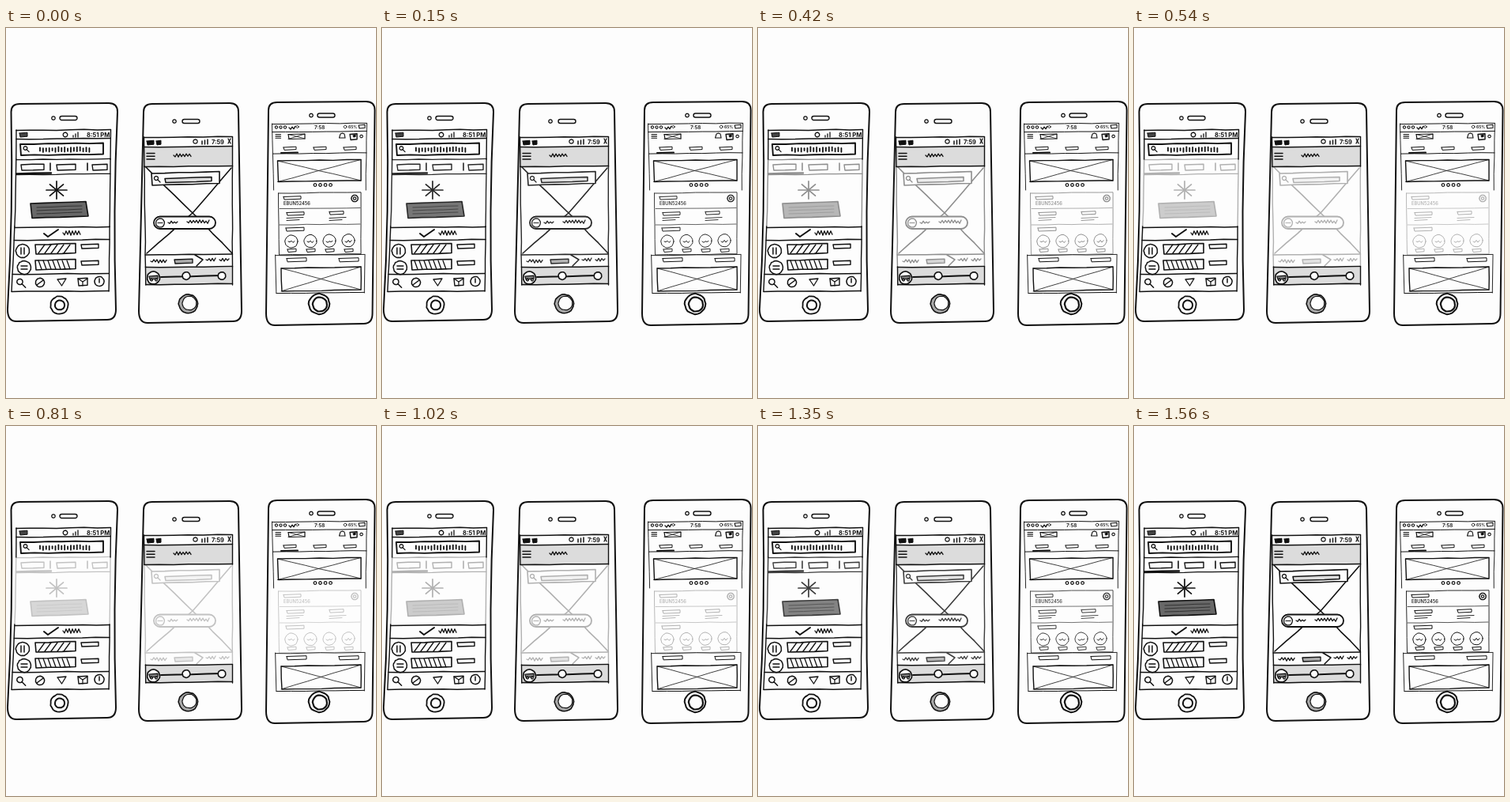
Write an HTML page that moves like this. It is 468 by 468 pixels and loops after 1790 ms.

```html
<!DOCTYPE html>
<html lang="en">
<head>
<meta charset="utf-8">
<title>Phone wireframes</title>
<style>
  html, body { margin: 0; width: 100%; height: 100%; overflow: hidden; background: #fdfdfd; }
  svg { display: block; width: 468px; height: 468px; }
  path { stroke-linecap: round; stroke-linejoin: round; }
  text { font-family: Inter, "DejaVu Sans", sans-serif; fill: #111; }
</style>
</head>
<body>
<svg id="stage" viewBox="0 0 468 468">
  <g id="still"></g>
  <g id="fading"></g>
</svg>
<script>
const INK = '#111', PAPER = '#fdfdfd', GREY = '#dcdcdc';
const still = document.getElementById('still');
const fading = document.getElementById('fading');
let layer = still;

let seed = 11;
const rand = () => (seed = (seed * 16807) % 2147483647) / 2147483647;
const jit = a => (rand() - 0.5) * a;
const repeat = (n, draw) => { for (let i = 0; i < n; i++) draw(i); };

function add(tag, attrs, text = '') {
  const el = document.createElementNS('http://www.w3.org/2000/svg', tag);
  for (const k in attrs) el.setAttribute(k, attrs[k]);
  el.textContent = text;
  layer.appendChild(el);
}
const path = (d, w, fill = 'none', stroke = INK) =>
  add('path', { d, fill, stroke, 'stroke-width': w });
const label = (x, y, size, str, weight = 600) =>
  add('text', { x, y, 'font-size': size, 'font-weight': weight }, str);

// Straight strokes with a slightly unsteady hand
function line(p, w = 1.2, fill, stroke) {
  let d = `M${p[0]} ${p[1]}`;
  for (let i = 2; i < p.length; i += 2) {
    const [x0, y0, x1, y1] = p.slice(i - 2, i + 2);
    const n = Math.max(1, Math.round(Math.hypot(x1 - x0, y1 - y0) / 18));
    for (let k = 1; k <= n; k++) {
      const j = k < n ? 0.8 : 0;
      d += `L${x0 + (x1 - x0) * k / n + jit(j)} ${y0 + (y1 - y0) * k / n + jit(j)}`;
    }
  }
  path(d, w, fill, stroke);
}
// Box whose top and bottom rise to the right by tilt
function box(x, y, w, h, weight = 1.2, fill, tilt = 0.8) {
  line([x, y, x + w, y - tilt, x + w, y + h - tilt, x + 1, y + h, x, y], weight, fill);
}
function crossed(x, y, w, h, weight, tilt) {
  box(x, y, w, h, weight, 'none', tilt);
  line([x, y, x + w, y + h - tilt], 0.8);
  line([x, y + h, x + w, y - tilt], 0.8);
}
function hatched(x, y, w, h, slant, gap) {
  box(x, y, w, h, 1.6, 'none', 1.5);
  for (let i = gap; i < w - gap; i += gap)
    line([x + i + slant, y, x + i - slant, y + h - 1], 1.3);
}
function ring(x, y, r, w = 1.3, fill) {
  let d = '';
  repeat(25, i => {
    const a = i / 24 * Math.PI * 2, q = r * (1 + jit(0.07));
    d += `${i ? 'L' : 'M'}${x + q * Math.cos(a)} ${y + q * Math.sin(a)}`;
  });
  path(d + 'Z', w, fill);
}
function scribble(x, len, y, h = 3, w = 1.3) {
  const p = [x, y];
  for (let i = 2; i <= len; i += 2) p.push(x + i, y + (i % 4 ? h : -h) / 2 + jit(1.5));
  line(p, w);
}
function lens(x, y, r, w = 1.3) {
  ring(x, y, r, w);
  line([x + r * 0.7, y + r * 0.7, x + r * 2, y + r * 2], w);
}
function pill(x, y, w, h, weight = 1.4, fill) {
  const r = h / 2;
  path(`M${x + r} ${y}h${w - h}a${r} ${r} 0 0 1 0 ${h}h${h - w}a${r} ${r} 0 0 1 0 ${-h}Z`, weight, fill);
}
function menu(x, y, len, gap, w) {
  repeat(3, i => line([x, y + i * gap, x + len, y + i * gap], w));
}

// Case: side edges run from top to bottom x, bowed inwards by waist
function body(tl, tr, bl, br, top, bottom, waist) {
  const r = 11, mid = (top + bottom) / 2;
  path(`M${tl} ${top + r}Q${tl} ${top + 1} ${tl + r} ${top + 1}L${tr - r} ${top}Q${tr} ${top} ${tr} ${top + r}
    Q${(tr + br) / 2 - waist} ${mid} ${br} ${bottom - r - 4}Q${br} ${bottom - 2} ${br - r} ${bottom - 2}
    L${bl + r} ${bottom}Q${bl} ${bottom} ${bl} ${bottom - r - 4}Q${(tl + bl) / 2 + waist} ${mid} ${tl} ${top + r}Z`, 2);
}
function speaker(x, y, gap) {
  ring(x, y, 2.2);
  pill(x + gap, y - 2.5, 22, 5);
}
// Screen edges as functions of y, with rules and sides drawn between them
function screen(left, right) {
  const side = (f, a, b, w) => line([f(a), a, f((a + b) / 2), (a + b) / 2, f(b), b], w);
  return {
    rule: (y, w = 1.5) => line([left(y), y + 0.6, right(y), y - 0.6], w),
    sides(a, b, w = 1.4) { side(left, a, b, w); side(right, a, b, w); },
    band: (a, b) => path(`M${left(a)} ${a}L${right(a)} ${a}L${right(b)} ${b - 2}L${left(b)} ${b}Z`, 0, GREY, 'none')
  };
}

function phoneLeft() {
  const s = screen(y => 13 - 6 * ((y - 129) / 205) ** 2, y => 132.5 - (y - 129) * 0.012);
  layer = still;
  body(6.5, 141, 2, 139, 95, 371, 5);
  speaker(60, 114, 8);
  s.sides(129, 166);
  s.sides(251, 333);
  [129, 140, 252, 268, 311, 333].forEach(y => s.rule(y));
  box(17, 133, 10, 5, 1, '#444');
  ring(75, 135, 2.8);
  repeat(3, i => line([85 + i * 3, 138, 85 + i * 3, 136 - i * 2], 1.3));
  label(102, 138, 7.6, '8:51 PM', 700);
  box(18, 147, 105, 14, 1.9, 'none', 1.5);
  lens(24.5, 152, 2.3);
  repeat(17, i => line([43 + i * 3.9, 151.5 + jit(2), 43 + i * 3.9, 156 + jit(2)], 1.8));

  line([48, 260, 53, 264, 66, 255], 2);
  scribble(72, 23, 259, 5);
  repeat(2, i => {
    const y = 282 + i * 21;
    ring(21 + i * 2, y, 8.5, 1.5);
    hatched(37, y - 8 - i, 51, 12, i ? -2 : 4, i ? 6 : 8);
    box(95, y - 8, 22, 5, 1.4);
  });
  [19, 23].forEach(x => line([x, 278, x, 286], 1.5));
  [301, 305].forEach(y => line([19, y, 27, y], 1.3));

  lens(17.5, 321, 3.6, 1.5);
  ring(43, 322, 5.6, 1.5);
  line([39, 325, 47, 319], 1.5);
  line([65, 318, 76, 317, 70.5, 326, 65, 318], 1.3);
  box(91, 317, 12, 9, 1.4);
  line([91, 317, 97, 321, 103, 317], 1.2);
  line([97, 321, 97, 326], 1.2);
  ring(118, 320.5, 6, 1.5);
  line([118, 317, 118, 322], 1.5);
  ring(67.5, 350.5, 11.2, 1.8);
  ring(68, 350.5, 6, 2);

  layer = fading;
  s.rule(166, 1.3);
  s.sides(166, 251);
  s.rule(185, 1.2);
  line([13, 184.5, 57, 183.5], 2.4);
  repeat(3, i => box(19 + i * 45, 173, 29 - i * 5, 7, 1.4));
  [56, 103].forEach(x => line([x, 171, x, 180], 1.6));
  repeat(4, i => {
    const a = i * Math.PI / 4, r = i % 2 ? 12 : 13;
    const dx = r * Math.cos(a), dy = r * 0.85 * Math.sin(a);
    line([64 - dx, 205 - dy, 64 + dx, 205 + dy], 1.7);
  });
  line([31, 222, 101, 219.5, 104, 238, 33, 240.5, 31, 222], 1.6, '#686868');
  repeat(3, i => line([39, 227 + i * 4, 96, 225 + i * 4], 1, 'none', '#333'));
}

function phoneMiddle() {
  const s = screen(y => 174.5 + (y - 138) * 0.012, () => 286.5);
  layer = still;
  body(174, 294, 168, 298, 95, 373, 0);
  speaker(213, 118, 10);
  s.band(150, 176);
  s.band(303, 326);
  s.sides(138, 175);
  s.sides(302, 325);
  [138, 150, 175, 302, 324].forEach(y => s.rule(y));
  repeat(2, i => box(178 + i * 12, 143, 9 - i * 3, 5, 1, INK));
  ring(239.5, 143.5, 2.6);
  repeat(3, i => line([248 + i * 3.5, 147, 248 + i * 3.5, 143 - i], 1.5));
  label(260, 146.5, 7.4, '7:59', 700);
  line([281, 140, 284, 146], 1.3);
  line([284, 140, 281, 146], 1.3);
  menu(178, 158.5, 10, 3.8, 1.5);
  scribble(212, 22, 161);
  line([196, 315, 273, 313], 2);
  ring(186.5, 316, 8, 1.7, PAPER);
  box(181, 314, 11, 4, 1.2, '#777');
  [184, 190].forEach(x => ring(x, 318.5, 1.4));
  [228, 273].forEach(x => ring(x, 313.5, 4.8, 1.6, PAPER));
  ring(230.5, 349, 12, 1.6, '#a9a9a9');
  ring(232, 348, 8.8, 1.2, PAPER);

  layer = fading;
  s.sides(175, 302);
  line([177, 176, 236, 234, 286, 285], 1.6);
  line([285, 177, 236, 234, 178, 285], 1.6);
  box(184, 184, 86, 15, 1.6, PAPER, 2.5);
  lens(190, 190, 2.5);
  box(201, 190.5, 59, 5, 1.5, GREY, 2);
  pill(187, 238.5, 78, 15.5, 1.8, PAPER);
  ring(195, 246.5, 5.5);
  line([192, 246.5, 198, 246.5]);
  scribble(205, 12, 246);
  scribble(229, 28, 245);
  s.rule(286.5);
  line([239, 287, 249, 293, 241, 301], 1.5);
  scribble(183, 20, 295);
  box(213, 293, 23, 5, 1.3, '#aaa');
  repeat(2, i => scribble(253 + i * 17, 13, 293));
}

function phoneRight() {
  const s = screen(y => 336.5 + (y - 121) * 0.025, y => 456.5 - (y - 121) * 0.015);
  layer = still;
  body(332, 466.5, 329, 463.5, 93, 376, 0);
  speaker(386, 110.5, 8);
  s.sides(121, 205, 0.9);
  s.sides(287, 335, 0.9);
  [121, 131, 158.5, 335].forEach(y => s.rule(y, 1));
  repeat(3, i => ring(342 + i * 5.5, 125.5, 1.6, 1.1));
  scribble(358, 8, 126);
  ring(368.5, 125, 1.5, 1);
  label(390, 127.8, 6.3, '7:58');
  ring(429, 125, 1.8, 1);
  label(433, 127, 5, '65%');
  box(446, 123, 8, 4, 1.1);
  menu(341, 134.5, 6.5, 2.4, 1.1);
  crossed(357, 134.5, 21, 6, 1.2, 0.5);
  line([421.5, 139, 423, 134, 425.5, 133, 428, 134, 429, 139, 421.5, 139], 1.1);
  box(435, 134.5, 9, 7, 1.4);
  box(439, 136, 3, 2, 1.2, INK);
  ring(449.5, 137, 1.7, 1.1);
  repeat(3, i => box(351 + i * 38, 151, 16, 3.4, 1));
  line([348, 158, 369, 157.5], 2);
  crossed(343.5, 168, 105.5, 26.5, 1.4, 1.5);
  repeat(4, i => ring(391 + i * 6.5, 198.5, 1.8, 1.2));
  s.rule(287, 0.9);
  repeat(2, i => box(355 + i * 66, 291.5, 25, 4.3, 1));
  crossed(348, 304, 101, 29, 1.4, 2);
  ring(396, 349, 13, 2);
  ring(397, 349.5, 9, 2.2);

  layer = fading;
  box(344.5, 209, 104.5, 78, 0.9, 'none', 1.2);
  box(351, 213.5, 22, 3.5, 1);
  label(351, 223.5, 5.8, 'EBUN52456', 500);
  ring(441, 215.5, 4.2, 1.4);
  ring(441, 215.5, 1.7, 1.2);
  [228.5, 249].forEach(y => line([346, y, 448, y - 1], 0.7));
  repeat(2, i => {
    const x = 355 + i * 54;
    box(x, 233.5 - i, 22 - i * 4, 3.6, 1);
    repeat(2, k => line([x, 240.5 + k * 3, x + 21 - k * 5, 239.5 + k * 3], 0.9));
  });
  box(354, 253, 23, 4, 1);
  repeat(4, i => {
    const x = 361 + i * 24;
    ring(x, 270 - i * 0.4, 8, 1);
    scribble(x - 4, 8, 270, 2, 1);
    box(x - 5, 280, 11, 3.5, 1);
  });
}

phoneLeft();
phoneMiddle();
phoneRight();

// The content areas dim and return in 30 ms steps, then rest
const LOOP = 1790, FADE = 1560, STEP = 30, LOW = 0.25;
const level = t => LOW + (1 - LOW) * ((1 + Math.cos(t / FADE * 2 * Math.PI)) / 2) ** 1.5;
const frames = Array.from({ length: FADE / STEP + 1 }, (_, i) => ({
  offset: i * STEP / LOOP, opacity: level(i * STEP), easing: 'step-end'
}));
frames.push({ offset: 1, opacity: 1 });
fading.animate(frames, { duration: LOOP, iterations: Infinity });
</script>
</body>
</html>
```
